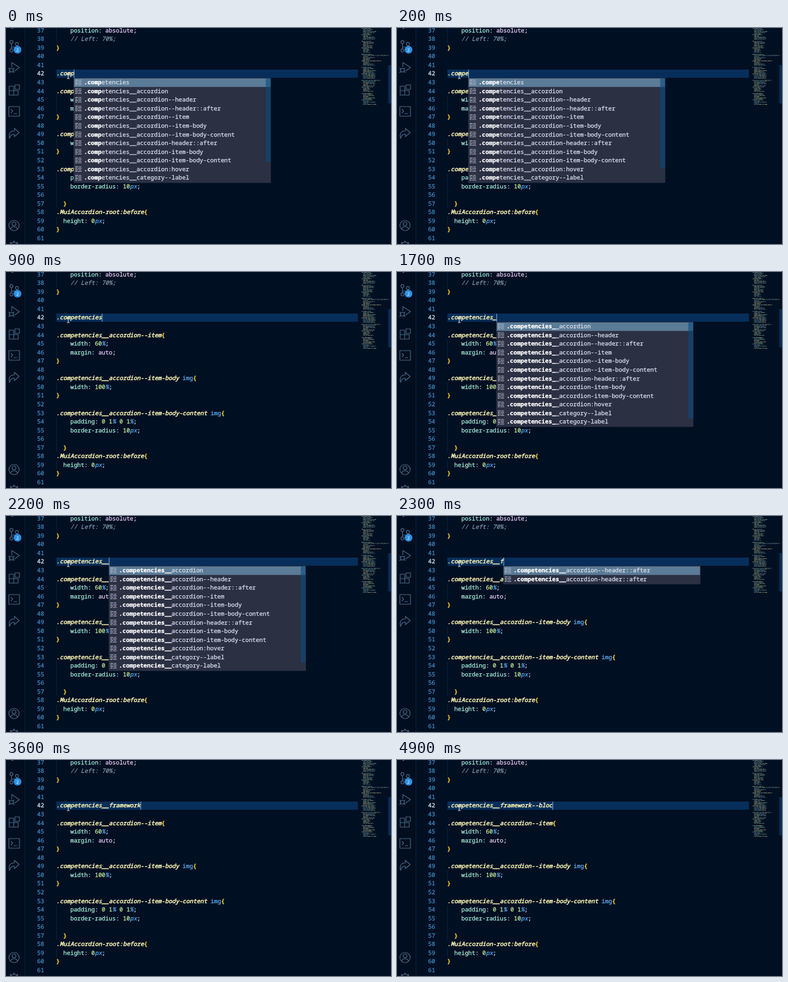
Recreate the animation shown at these times as an HTML page with a canvas. Size 600x338 px, loop 5000 ms.

```html
<!DOCTYPE html>
<html lang="en">
<head>
<meta charset="utf-8">
<title>Typing a selector</title>
<style>
html, body { margin: 0; width: 100%; height: 100%; overflow: hidden; background: #010f22; }
canvas { display: block; width: 600px; height: 338px; }
</style>
</head>
<body>
<canvas id="stage"></canvas>
<script>
const W = 600, H = 338, LOOP = 5000;
const CHAR = 5.467, LINE = 13.56, CODE_X = 78.3, POPUP_ROWS = 12;
const FONT = '9.1px "Noto Sans Mono", "DejaVu Sans Mono", monospace';
const canvas = document.getElementById('stage');
const ctx = canvas.getContext('2d');
const ratio = window.devicePixelRatio || 1;
canvas.width = W * ratio;
canvas.height = H * ratio;

// Token kinds: colour, font style and extra stroke weight
const STYLES = {
  s: ['#fbf3b0', 'italic', 0.5], b: ['#ffd52e', '', 0.5], p: ['#a3e8d6'],
  w: ['#d6deeb'], v: ['#e3c6ee'], n: ['#c6e89a'],
  u: ['#58a6f5', 'italic'], t: ['#5aa9e6'], c: ['#8292a6', 'italic']
};

// Each token is its kind letter followed by its text
const CODE = {
  37: '    |pposition|w: |vabsolute|w;',
  38: '    |c// Left: 70%;',
  39: 'b}',
  44: 's.competencies__accordion--item|b{',
  45: '    |pwidth|w: |n60|u%|w;',
  46: '    |pmargin|w: |vauto|w;',
  47: 'b}',
  49: 's.competencies__accordion--item-body |timg|b{',
  50: '    |pwidth|w: |n100|u%|w;',
  51: 'b}',
  53: 's.competencies__accordion--item-body-content |timg|b{',
  54: '    |ppadding|w: |n0 1|u%|n 0 1|u%|w;',
  55: '    |pborder-radius|w: |n10|upx|w;',
  57: '  |b}',
  58: 's.MuiAccordion-root:before|b{',
  59: '  |pheight|w: |n0|upx|w;',
  60: 'b}'
};

const BLOCK = '.competencies';
const SELECTORS = [
  BLOCK,
  ...['accordion', 'accordion--header', 'accordion--header::after', 'accordion--item',
    'accordion--item-body', 'accordion--item-body-content', 'accordion-header::after',
    'accordion-item-body', 'accordion-item-body-content', 'accordion:hover',
    'category--label', 'category-label', 'title'].map(name => BLOCK + '__' + name),
  '.component'
];

const FULL = '.competencies__framework--bloc';
// [time, typed characters, suggestions open, caret hidden]
const STEPS = [
  [0, 5, true], [200, 6, true], [400, 7, true], [600, 8, true],
  [900, 13], [1400, 13, false, true], [1600, 14], [1700, 14, true],
  [1800, 15, true], [2300, 16, true], [2500, 17, true], [2600, 18],
  [2700, 19], [2900, 20], [3100, 21], [3200, 22], [3400, 23], [3500, 24],
  [4000, 25], [4100, 26], [4400, 27], [4500, 28], [4800, 29], [4900, 30]
];

const lineY = n => 71.5 + (n - 42) * LINE;

function rect(x, y, w, h, color) {
  ctx.fillStyle = color;
  ctx.fillRect(x, y, w, h);
}

// Draws on the fixed character grid and returns the next x
function text(str, x, y, color, style = '', weight = 0.28) {
  ctx.font = style + ' ' + FONT;
  ctx.fillStyle = ctx.strokeStyle = color;
  ctx.lineWidth = weight;
  for (const ch of str) {
    if (ch !== ' ') {
      ctx.fillText(ch, x, y + 2.9);
      ctx.strokeText(ch, x, y + 2.9);
    }
    x += CHAR;
  }
  return x;
}

function codeLine(source, y) {
  let x = CODE_X;
  for (const part of source.split('|')) {
    if (!part.trim()) x += part.length * CHAR;
    else x = text(part.slice(1), x, y, ...STYLES[part[0]]);
  }
}

const ICON = '#48647f';

function stroke(path, color = ICON, width = 1.1) {
  ctx.strokeStyle = color;
  ctx.lineWidth = width;
  ctx.stroke(new Path2D(path));
}

function circle(x, y, r, color, filled) {
  ctx.beginPath();
  ctx.arc(x, y, r, 0, Math.PI * 2);
  ctx.lineWidth = 1.1;
  ctx.fillStyle = ctx.strokeStyle = color;
  filled ? ctx.fill() : ctx.stroke();
}

function activityBar() {
  rect(0, 0, 29.5, H, '#010e20');
  rect(29, 0, 1, H, '#0b2036');
  stroke('M5 -4L10 1L14 -3');
  circle(8.5, 22, 2.4, ICON);
  circle(8.5, 35, 2.4, ICON);
  circle(17, 25, 2.4, ICON);
  stroke('M8.5 24.5V32.5M17 27.5Q17 30 13 30H8.5');
  circle(18, 34, 6, '#2b91e6', true);
  ctx.font = '7px "Open Sans", sans-serif';
  ctx.fillStyle = '#fff';
  ctx.textAlign = 'center';
  ctx.fillText('2', 18, 36.6);
  ctx.textAlign = 'left';
  stroke('M9 61V54L21 62L13 67.5');
  circle(8.5, 66, 3, ICON);
  stroke('M4 62.5L6 64M4 66H5.5M4 70L6 68M13 62.5L11 64M13 70L11 68');
  stroke('M5 91H12V105H5ZM5 98H19V105H12M14 89H21V96H14Z');
  stroke('M4.5 123H21V138H4.5ZM7.5 127L10.5 130L7.5 133M12 134H17');
  stroke('M13 157L20.5 163.5L13 170V166Q7 166 5.5 173Q3 161 13 161Z');
  circle(12.5, 309, 8, ICON);
  circle(12.5, 306.5, 3, ICON);
  stroke('M7 315Q8 311 12.5 311Q17 311 18 315');
  circle(12.5, 341, 6, ICON);
  circle(12.5, 341, 2.2, ICON);
  stroke('M12.5 333V335.5M6.5 335.5L8.3 337M18.5 335.5L16.7 337', ICON, 1.8);
}

function minimap() {
  let seed = 17;
  const random = () => (seed = seed * 16807 % 2147483647) / 2147483647;
  const colors = ['#6f8272', '#8a8d6c', '#4d7380'];
  for (let row = 0; row < 72; row++) {
    const y = row * 1.7;
    const part = row % 6;
    const width = row === 25 ? 40 : part ? 7 + random() * 14 : 15 + random() * 21;
    if (row % 12 === 11) continue;
    for (let x = 0; x < width;) {
      const word = Math.min(2 + random() * 4, width - x);
      rect((part ? 556.5 : 554) + x, y, word, 0.9, colors[Math.floor(random() * 3)]);
      x += word + 0.7;
    }
  }
  rect(595.5, 58, 4.5, 60, '#082b50');
}

function suggestionIcon(x, y) {
  for (let i = 0; i < 4; i++) {
    const top = y - 4.2 + i * 2.4;
    rect(x, top, i % 2 ? 3 : 4.5, 1, '#c5cbd5');
    rect(x + (i % 2 ? 4 : 5.5), top, i % 2 ? 6 : 4, 1, '#aeb6c4');
  }
}

function matches(typed) {
  const start = SELECTORS.filter(name => name.startsWith(typed));
  if (start.length) return start;
  return SELECTORS.filter(name => name.includes('::after'));
}

function popup(typed) {
  const found = matches(typed);
  const rows = found.slice(0, POPUP_ROWS);
  const x = CODE_X + typed.length * CHAR + 0.2, y = 78.3, width = 306.5;
  const height = rows.length * LINE + 1;
  rect(x, y, width, height, '#2b3043');
  rect(x, y + 0.4, width, LINE, '#5b7b96');
  if (found.length > POPUP_ROWS)
    rect(x + width - 7.5, y, 7.5, height * POPUP_ROWS / found.length, 'rgba(8,77,129,.6)');
  ctx.strokeStyle = '#34394d';
  ctx.lineWidth = 0.6;
  ctx.strokeRect(x, y, width, height);
  rows.forEach((name, i) => {
    const rowY = 85.3 + i * LINE;
    const prefix = name.startsWith(typed) ? typed : typed.slice(0, 15);
    suggestionIcon(x + 2, rowY);
    const next = text(prefix, x + 15.6, rowY, '#fff', 'bold');
    text(name.slice(prefix.length), next, rowY, '#d6deeb');
  });
}

function pointer() {
  stroke('M95 71.5Q97 71.5 97 73V78Q97 79.5 95 79.5M99 71.5Q97 71.5 97 73M97 78Q97 79.5 99 79.5', '#e8edf2', 0.9);
}

function draw(time) {
  const [, count, open, caretHidden] = STEPS.filter(step => step[0] <= time).pop();
  const typed = FULL.slice(0, count);
  ctx.setTransform(ratio, 0, 0, ratio, 0, 0);
  ctx.textRendering = 'geometricPrecision';
  ctx.lineJoin = 'round';
  rect(0, 0, W, H, '#010f22');
  activityBar();
  minimap();
  rect(78.5, 65, 470, 12.8, '#072e5b');
  for (const [first, last] of [[37, 38], [45, 46], [50, 50], [54, 57], [59, 59]])
    rect(78.5, lineY(first) - LINE / 2, 0.6, (last - first + 1) * LINE, '#153047');
  for (let n = 37; n <= 61; n++) {
    text(String(n), 48.6, lineY(n), n === 42 ? '#d3e2ef' : '#3f88bd');
    if (CODE[n]) codeLine(CODE[n], lineY(n));
  }
  codeLine('s' + typed, lineY(42));
  if (!caretHidden) rect(CODE_X + count * CHAR, 65, 1, 13, '#79a9d6');
  if (open) popup(typed);
  pointer();
}

const origin = performance.now();
function tick() {
  draw((performance.now() - origin) % LOOP);
  requestAnimationFrame(tick);
}
tick();
</script>
</body>
</html>
```
